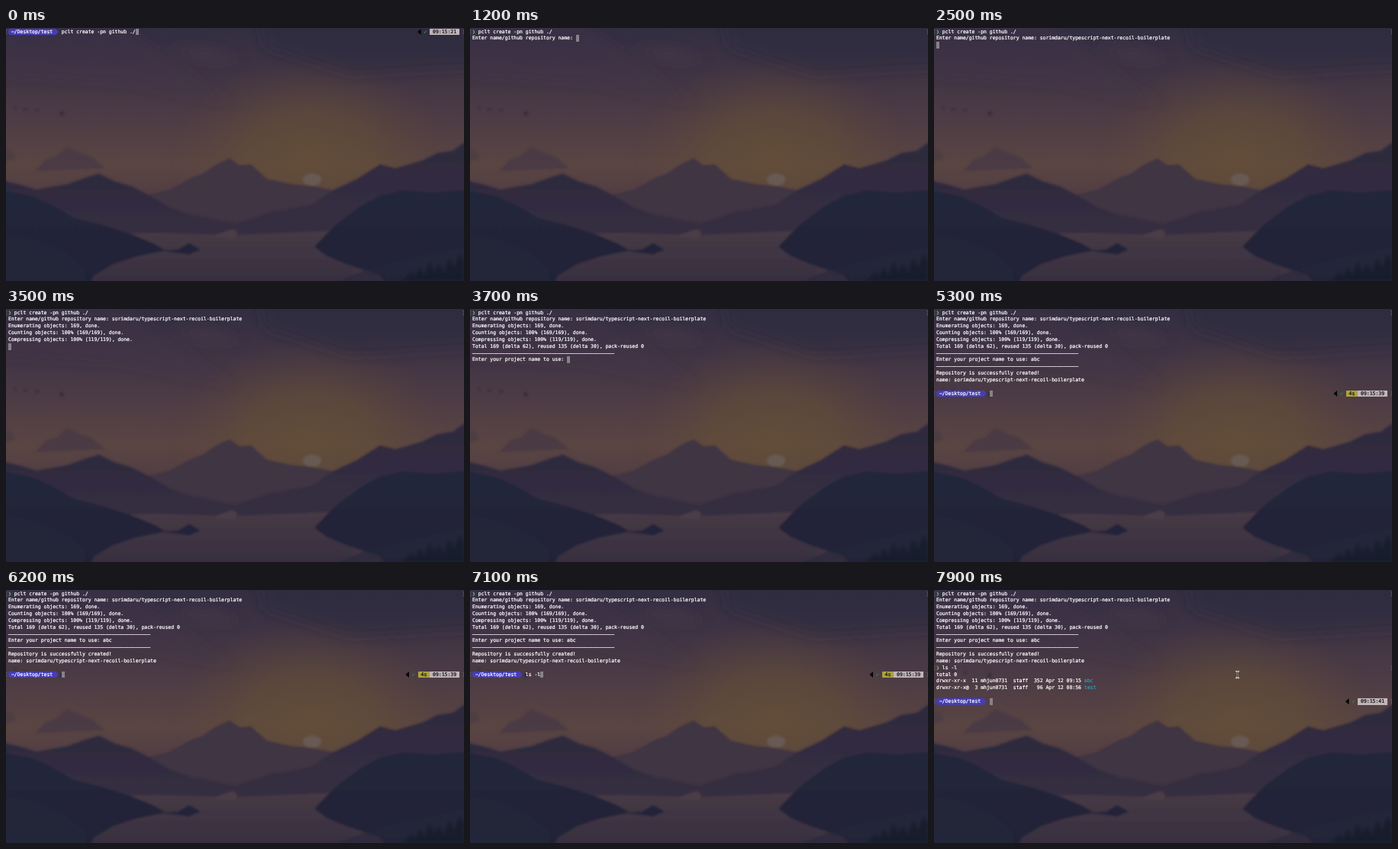
Write an HTML page that moves like this. It is 600 by 332 pixels and loops after 8 s.

```html
<!DOCTYPE html>
<html lang="en">
<head>
<meta charset="utf-8">
<title>Terminal session</title>
<style>
  html, body { margin: 0; width: 100%; height: 100%; overflow: hidden; background: #302b41; }
  svg { position: absolute; left: 0; top: 0; }
  #screen {
    position: absolute; left: 0; top: .6px; width: 600px;
    font: 6.455px/8.84px "DejaVu Sans Mono", monospace;
    text-rendering: geometricPrecision;
    -webkit-text-stroke: .22px;
    white-space: pre; color: #fff;
  }
  .row { position: relative; height: 8.84px; padding-left: 3px; }
  .row > *, .status > * { display: inline-block; height: 8.84px; vertical-align: top; }
  .cursor { width: 1ch; background: #87838a; }
  .path {
    padding: 0 2ch 0 1ch; margin-right: 1ch; background: #453db6;
    border-radius: 3px 0 0 3px;
    clip-path: polygon(0 0, calc(100% - 4px) 0, 100% 50%, calc(100% - 4px) 100%, 0 100%);
  }
  .row > .status { position: absolute; right: 6px; top: 0; color: #15121a; }
  .arrow { width: 1.2ch; background: #050408; clip-path: polygon(100% 5%, 100% 95%, 0 50%); }
  .ok { color: #2f8a35; }
  .took { background: #aaa13f; }
  .clock { background: #c0b6b8; }
  .done { width: 2ch; color: #55d052; }
  .dir { color: #2f9ab4; }
  .row > .mark {
    position: absolute; top: 1.5px; box-sizing: border-box; width: 2px; height: 6px;
    border: 1px solid #77717e; opacity: .4;
  }
  .mark.left { left: 0; border-right: 0; }
  .mark.right { right: 0; border-left: 0; }
</style>
</head>
<body>
<svg width="600" height="332">
  <defs>
    <linearGradient id="sky" x2="0" y2="1">
      <stop offset="0" stop-color="#332e42"/>
      <stop offset=".18" stop-color="#403444"/>
      <stop offset=".36" stop-color="#4d3c45"/>
      <stop offset=".54" stop-color="#5a4543"/>
      <stop offset=".64" stop-color="#533f43"/>
      <stop offset="1" stop-color="#3f3444"/>
    </linearGradient>
    <radialGradient id="glow">
      <stop offset="0" stop-color="#665036" stop-opacity=".75"/>
      <stop offset=".45" stop-color="#655036" stop-opacity=".55"/>
      <stop offset="1" stop-color="#5c463c" stop-opacity="0"/>
    </radialGradient>
    <linearGradient id="far" x2="0" y2="1">
      <stop offset="0" stop-color="#403443"/>
      <stop offset="1" stop-color="#3f3342"/>
    </linearGradient>
    <linearGradient id="ridge" x2="0" y2="1">
      <stop offset="0" stop-color="#2d293d"/>
      <stop offset="1" stop-color="#372f41"/>
    </linearGradient>
    <linearGradient id="water" x2="0" y2="1">
      <stop offset="0" stop-color="#473a44"/>
      <stop offset="1" stop-color="#352d40"/>
    </linearGradient>
    <linearGradient id="near" x2="0" y2="1">
      <stop offset="0" stop-color="#21253a"/>
      <stop offset="1" stop-color="#1f2337"/>
    </linearGradient>
    <filter id="soft" x="-10%" y="-10%" width="120%" height="120%"><feGaussianBlur stdDeviation="1.8"/></filter>
    <filter id="haze" x="-30%" y="-50%" width="160%" height="200%"><feGaussianBlur stdDeviation="8"/></filter>
  </defs>
  <rect width="600" height="332" fill="url(#sky)"/>
  <g filter="url(#haze)">
    <path d="M-20-20H130L260 75 300 100 150 70-20 60Z" fill="#44384a" opacity=".35"/>
    <path d="M330-20H620V50L450 60 340 25Z" fill="#2f293f" opacity=".5"/>
    <path d="M210 25 265 28 310 42 260 40Z" fill="#4d3e4c" opacity=".6"/>
  </g>
  <ellipse cx="398" cy="168" rx="185" ry="130" fill="url(#glow)"/>
  <g filter="url(#soft)">
    <path d="M38 188 52 173 66 168 80 156 95 163 112 169 130 184Z" fill="#493a44" opacity=".8"/>
    <path d="M-5 157 8 162 12 172-5 176Z" fill="#493a44" opacity=".7"/>
    <g fill="#352e40">
      <circle cx="73" cy="112" r="3"/><circle cx="41" cy="108" r="2"/>
      <circle cx="25" cy="107" r="2"/><circle cx="12" cy="105" r="1.5"/>
    </g>
    <ellipse cx="401" cy="199" rx="12" ry="8" fill="#675a53"/>
    <path d="M170 223 215 212 240 198 258 191 275 179 293 171 306 180 321 179 342 198 375 205 400 207 430 213 445 275H170Z" fill="url(#far)"/>
    <path d="M295 264 345 242 400 232 430 212 460 198 490 179 510 184 545 174 565 164 585 161 605 147V275H295Z" fill="url(#ridge)"/>
    <path d="M-5 200 20 206 40 212 80 205 105 196 122 191 142 201 165 208 185 218 215 236 250 248 310 268V280H-5Z" fill="url(#ridge)"/>
    <path d="M200 250 250 246 300 257 350 241 405 238 450 228V275H200Z" fill="#352d41"/>
    <path d="M100 271 200 269 295 272 440 266 460 340H80Z" fill="url(#water)"/>
    <path d="M270 273 297 264 303 268 300 276Z" fill="#4c3c45"/>
    <path d="M-5 213 35 221 60 232 88 249 131 260 165 271 194 283 209 292 170 300 140 310 115 325 108 340H-5Z" fill="url(#near)"/>
    <path d="M-5 270 40 278 80 296 104 318 105 340H-5Z" fill="#242739" opacity=".6"/>
    <path d="M200 292 225 291 240 282 255 291 240 297Z" fill="#22243a"/>
    <path d="M605 212 560 216 520 213 490 220 466 233 436 255 420 270 404 287 420 299 446 310 490 324 500 340H605Z" fill="url(#near)"/>
    <path d="M420 340 470 317 520 304 605 286V340Z" fill="#242638" opacity=".5"/>
  </g>
  <path d="M522 332 530 321 536 326 542 315 548 323 555 308 561 319 567 311 574 320 581 304 587 314 594 299 600 306V332Z" fill="#171a2c" opacity=".85" filter="url(#soft)"/>
</svg>
<div id="screen"></div>
<svg id="pointer" width="600" height="332" fill="none">
  <path id="beam" d="M395 106.5q2.5 0 2.5 2v5q0 2-2.5 2M400 106.5q-2.5 0-2.5 2v5q0 2 2.5 2" stroke="#c9c5c6" stroke-width="1.7"/>
  <path d="M397.5 107.5v7" stroke="#17141b" stroke-width=".7"/>
</svg>
<script>
const LOOP = 8000;
const COMMAND = 'pclt create -pn github ./';
const REPO = 'sorimdaru/typescript-next-recoil-boilerplate';
const RULE = '–'.repeat(48);
const screenEl = document.getElementById('screen');
const pointer = document.getElementById('pointer');

const span = (name, text = '') => `<span class="${name}">${text}</span>`;
const marks = span('mark left') + span('mark right');
const finished = command => marks + span('done', '❯') + command;
const prompt = (typed, clock, took) => marks + span('path', '~/Desktop/test') + typed +
  span('status', span('arrow') + span('ok', ' ✔ ') +
    (took ? span('took', ` ${took} `) : '') + span('clock', ` ${clock} `));

// Text typed so far, one character every 100 ms from the start time
const typed = (text, start, t) => text.slice(0, Math.max(0, Math.floor((t - start) / 100) + 1));

function rowsAt(t) {
  if (t < 1000) return [prompt(COMMAND, '09:15:21')];
  const rows = [finished(COMMAND)];
  const add = (start, ...lines) => { if (t >= start) rows.push(...lines); };

  add(1200, 'Enter name/github repository name: ' + (t >= 2000 ? REPO : ''));
  add(3500, 'Enumerating objects: 169, done.',
    'Counting objects: 100% (169/169), done.',
    'Compressing objects: 100% (119/119), done.');
  add(3600, 'Total 169 (delta 62), reused 135 (delta 30), pack-reused 0');
  add(3700, RULE, 'Enter your project name to use: ' + typed('abc', 4400, t));
  add(4900, RULE);
  add(5000, 'Repository is successfully created!', 'name: ' + REPO);

  if (t >= 7300) {
    add(7300, finished('ls -l'));
    add(7400, 'total 0',
      'drwxr-xr-x  11 mhjun0731  staff  352 Apr 12 09:15 ' + span('dir', 'abc'),
      'drwxr-xr-x@  3 mhjun0731  staff   96 Apr 12 08:56 ' + span('dir', 'test'));
    add(7500, '', prompt('', '09:15:41'));
  } else {
    add(5100, '', prompt(typed('ls -l', 6700, t), '09:15:39', '4s'));
  }

  // While a command works, the cursor waits on an empty line
  const waiting = [[1000, 1200], [2400, 3700], [4800, 5100], [7300, 7500]];
  if (waiting.some(([from, to]) => t >= from && t < to)) rows.push('');
  return rows;
}

let shown = '';
function draw(now) {
  const t = now % LOOP;
  const rows = rowsAt(t);
  rows[rows.length - 1] += span('cursor');
  const html = rows.map(row => `<div class="row">${row}</div>`).join('');
  if (html !== shown) screenEl.innerHTML = shown = html;
  pointer.style.display = t >= 7700 ? 'block' : 'none';
  requestAnimationFrame(draw);
}
draw(performance.now());
</script>
</body>
</html>
```
